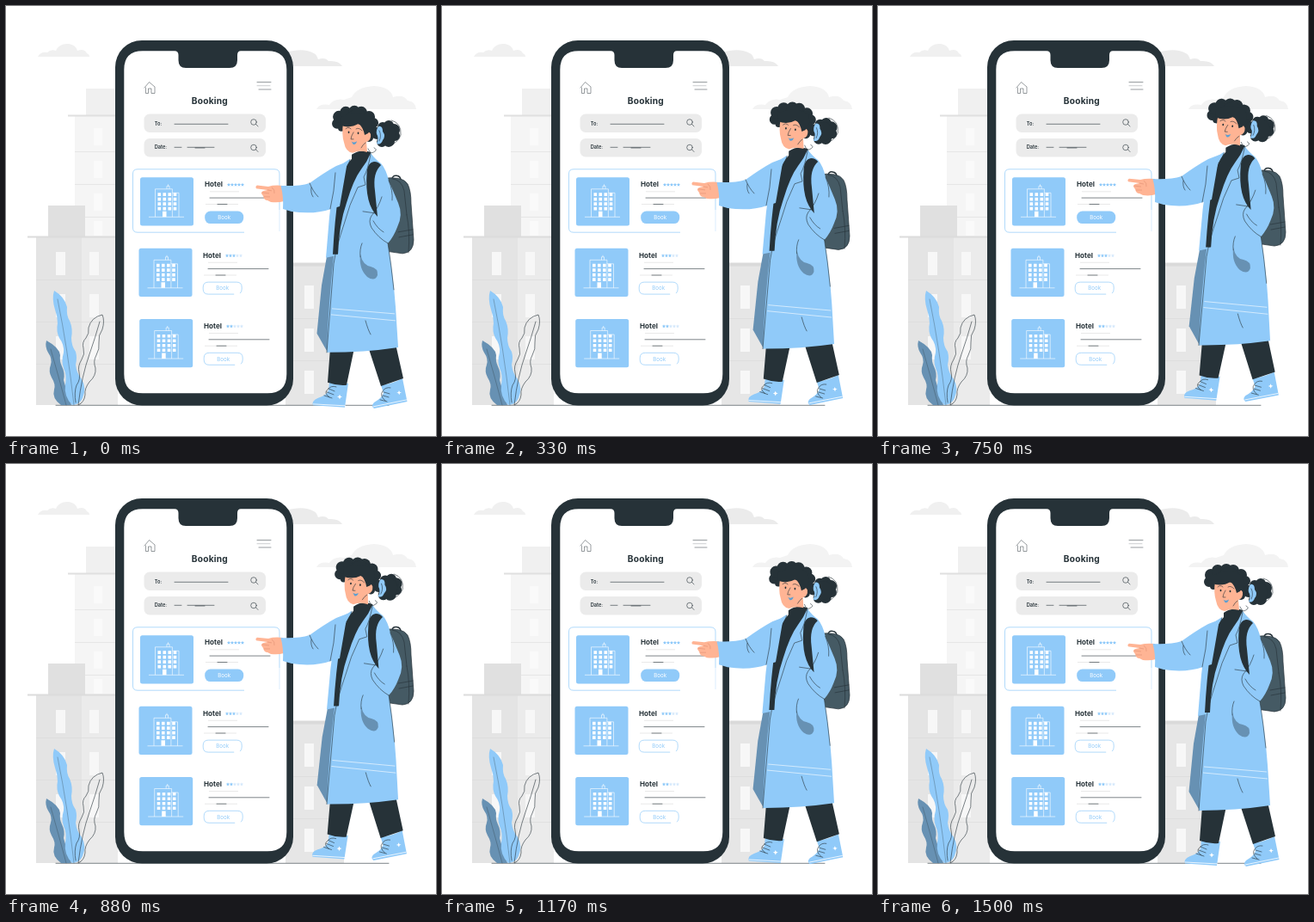
An HTML page that plays this animation: 500x500 px, repeating every 1.54 s.

```html
<!DOCTYPE html>
<html lang="en">
<head>
<meta charset="utf-8">
<title>Hotel booking</title>
<style>
  html, body { margin: 0; width: 100%; height: 100%; overflow: hidden; background: #fff; }
  svg { display: block; width: 100%; height: 100%; }
  text { font-family: Inter, sans-serif; fill: #263238; }
  .ink { fill: #263238; }
  .blue { fill: #90caf9; }
  .shade { fill: #6791b3; }
  .skin { fill: #ffb494; }
  .white { fill: #fff; }
  .line { fill: none; stroke: #263238; stroke-width: .6; stroke-linecap: round; stroke-linejoin: round; }
  .pale { fill: none; stroke: #e0e0e0; stroke-width: .7; }
  .edge { fill: none; stroke: #90caf9; stroke-width: .7; }
  .thin { fill: none; stroke: #fff; stroke-width: .6; }
</style>
</head>
<body>
<svg viewBox="0 0 500 500">
  <g id="clouds">
    <path fill="#f0f0f0" d="M37 59Q40 53 48 54Q52 50 58 52Q62 43 73 44Q81 45 83 52Q91 49 94 55Q97 56 97 59Z"/>
    <path fill="#ebebeb" d="M325 70V54Q340 50 350 52Q361 54 363 62Q371 59 375 64Q387 63 391 70Z"/>
    <path fill="#f3f3f3" d="M361 120Q365 113 376 115Q382 107 393 109L402 106Q408 94 428 93Q447 94 450 106Q462 102 467 110Q476 111 477 120Z"/>
  </g>

  <g id="city">
    <path fill="#f0f0f0" d="M93 96h40v32H93z"/>
    <path fill="#f5f5f5" d="M80 127h50v142H80z"/>
    <path fill="#e0e0e0" d="M72 126.5h57v2H72z"/>
    <path class="pale" d="M80 169.500h50M80 207.500h50M80 245.500h50"/>
    <path fill="#fafafa" d="M102 142h10v20h-10zM102 180h10v20h-10zM102 218h10v20h-10zM102 250h10v17h-10z"/>
    <path fill="#e0e0e0" d="M49 232h43v37H49z"/>
    <path fill="#ebebeb" d="M35 268h95v196H35z"/>
    <path fill="#e4e4e4" d="M35 268h53v196H35z"/>
    <path fill="#dcdcdc" d="M25 267.500h103v2H25z"/>
    <path stroke="#dcdcdc" stroke-width=".7" d="M35 318.500h95M35 367.500h95M35 416.500h95"/>
    <path fill="#f7f7f7" d="M58 286h11v27H58zM97 286h11v27H97zM58 335h11v27H58zM97 335h11v27H97zM58 384h11v27H58zM97 384h11v27H97z"/>
    <path fill="#e6e6e6" d="M325 299h68v165h-68z"/>
    <path fill="#dadada" d="M325 298.500h75v4H325z"/>
    <path stroke="#dcdcdc" stroke-width=".7" d="M330 363.500h63M330 412.500h63"/>
    <path fill="#f7f7f7" d="M347 325h11v27h-11zM347 375h11v27h-11zM347 424h11v27h-11z"/>
  </g>
  <path class="line" d="M58 464.300H445"/>

  <g id="plant">
    <path class="shade" d="M47 389Q62 397 63 406Q62 413 65 419Q69 427 67 435Q71 450 76 464H64Q53 456 56 446Q58 440 53 432Q49 425 52 417Q54 410 49 403Q45 396 47 389Z"/>
    <path class="blue" d="M56 331Q68 338 71 350Q70 360 74 366Q78 375 76 386Q76 395 81 402Q83 409 81 417Q82 427 88 434Q94 444 89 456Q86 463 77 464Q67 454 69 440Q71 430 67 421Q64 413 67 403Q68 394 62 386Q58 378 60 369Q60 361 57 353Q53 340 56 331Z"/>
    <path class="line" d="M81 461Q79 449 82 441Q87 434 85 426Q83 419 88 411Q92 405 90 398Q88 391 93 386Q97 381 96 374Q99 362 112 359Q115 366 112 376Q107 383 108 391Q109 399 105 406Q101 413 104 421Q105 430 97 437Q91 445 92 452Q91 461 84 464Q88 430 97 405Q104 385 109 367"/>
    <path class="line" stroke-opacity=".5" d="M60 341Q72 400 79 464M52 399Q61 430 70 464"/>
  </g>

  <g id="phone">
    <rect class="ink" x="127" y="40" width="207" height="424.500" rx="31"/>
    <path class="white" d="M159 52.300H196Q200.500 52.300 200.500 57V63Q200.500 72 209 72H260Q269 72 269 63V57Q269 52.300 273 52.300H304Q326.300 52.300 326.300 74V428Q326.300 450.300 304 450.300H159Q137.300 450.300 137.300 428V74Q137.300 52.300 159 52.300Z"/>
    <path class="line" stroke-opacity=".8" d="M161 95L166.500 88.500L173 94V101.500H169V96H165.500V101.500H162.500V95M292 88.500H308M294 97H308"/>
    <path class="line" stroke-opacity=".4" d="M292 92.700H307"/>
    <text x="215.800" y="113.500" font-size="10.200" font-weight="700" letter-spacing=".2">Booking</text>
    <rect x="160.500" y="125.500" width="141.500" height="21.500" rx="6.500" fill="#ebebeb"/>
    <rect x="160.500" y="154" width="141.500" height="21.500" rx="6.500" fill="#ebebeb"/>
    <text x="172.800" y="138.500" font-size="5.600" font-weight="600">To:</text>
    <text x="172.800" y="166" font-size="5.600" font-weight="600">Date:</text>
    <path class="line" d="M196 137.300H258M196 164.300H204M211 164.300H242M220 165H231M290.600 137.400L293 140M290.600 166.900L293 169.500"/>
    <circle class="line" cx="288" cy="135" r="3.300"/>
    <circle class="line" cx="288" cy="164.500" r="3.300"/>
    <path class="edge" d="M277 263.200H153Q147.500 263.200 147.500 258V195Q147.500 189.800 153 189.800H312Q318 189.800 318 195V237"/>
    <path class="edge" stroke-opacity=".45" d="M318 237V262"/>
    <g id="cards"></g>
  </g>

  <g id="traveller">
    <g id="pack">
      <path class="line" style="stroke-width:1.500" d="M449 202Q449 197 454 197.500Q459 198 459 203"/>
      <path fill="#455a64" stroke="#263238" stroke-width=".7" d="M436 201Q461 197 467 207Q471 215 471 230L474 272Q474 287 461 288L440 285Z"/>
      <path class="line" d="M449 201Q460 202 463 215L466 243M456 263L473 260M457 269L473 266M466 243Q470 262 468 287"/>
    </g>

    <g id="body">
      <path class="blue" d="M376 438Q388 440 398 439L394 467L357 464.500Q355 459 363 456Q373 453 375 447Z"/>
      <path class="blue" d="M436 441Q450 439 461 433L466.500 460L428 468Q424 465 428 461Q437 456 439 450Z"/>
      <path class="ink" d="M377 398L374 438Q385 442 396 441L405 398ZM421 396L436 442L462 433L453 393Z"/>
      <path stroke="#fff" stroke-width=".8" fill="none" d="M357 463L395 465M427 466L466 458"/>
      <path class="line" d="M370 453L379 456M373 449L381 452M375 445L382 448M376 455Q369 450 374 446Q378 441 384 443M435 458L443 460M438 453L445 455M439 449L446 451M441 459Q434 453 438 448Q441 443 447 444"/>
      <path class="white" d="M388 452l1 2 2 .5-2 1-1 2-1-2-2-1 2-.5zM457 447l1 2 2 .3-2 1-.6 2-1.200-2-2-.5 2-.8z"/>

      <path class="shade" d="M375 280L367 325L361.500 381L374 403L392 390V284Z"/>
      <path class="blue" d="M400 178Q386 186 382 196L376 245L372 293L386 290L398 240Z"/>
      <path class="ink" d="M402 173Q412 166 424 170L425 178L390 289L380 289Q382 250 387 215Q391 190 402 178Z"/>
      <path class="blue" d="M424 171Q430 179 436 183Q442 190 445 203L456 229Q462 243 455 257Q451 268 444 276Q450 310 453 350L456 397Q416 403 373 403Q375 345 381 291L386 289Q387 255 396 229Q404 202 413 190Q420 181 424 171Z"/>
      <path class="ink" d="M419.500 195Q420 182 428 181Q433 181 436 185Q426 194 429 215L432 245Q417 230 419.500 195Z"/>
      <path class="line" d="M424 172Q421 190 416 199L418 208L409 211Q399 231 393 254Q384 280 381 300L373 403M400 179L396 190L391 192L388 202"/>
      <path class="line" d="M437 222Q433 235 425 244Q421 250 425 258Q433 270 444 276M415 239L429 241M445 203Q450 215 449 226M418 366Q421 377 424 382M444 276Q448 301 451 330M427 250Q432 259 439 263"/>
      <path class="shade" d="M412 289Q415 302 424 303Q433 305 432 313Q429 321 420 315Q410 306 412 289Z"/>
      <path class="line" d="M414 276Q411 283 412 292"/>
      <path stroke="#fff" stroke-width=".6" fill="none" d="M379 352L452 358M378 359L453 366"/>
    </g>

    <g id="arm">
      <path class="skin" d="M322 209Q312 208 305 210L292 208.700Q289.500 210 291 212.300L304 214Q296 215 297 218L299 221Q300 226 304 226L308 228Q317 229 323 227Z"/>
      <path fill="none" stroke="#e08f72" stroke-width=".6" d="M304 214L309 215M298 217L306 218M300 222L307 222M309 211Q313 214 312 218"/>
      <path class="blue" d="M319.500 209Q340 210 353 206Q371 193 384 186L397 181L388 233L378 236Q358 243 332 239L322 236Q323 222 319.500 209Z"/>
      <path class="line" d="M353 206Q357 216 363 222M383 194Q382 215 377 236M355 211Q354 218 357 222"/>
    </g>

    <g id="head">
      <path class="line" d="M421 166Q424 174 429 169Q432 167 428 165M448 133Q460 136 459 150Q456 160 443 163"/>
      <g class="ink" id="curls"></g>
      <path class="skin" d="M392 136Q390 150 393 159Q395 170 403 171Q408 169 412 169Q416 169 420 170L419 158Q425 156 424 149Q422 144 418 149Q417 139 408 137Z"/>
      <path class="ink" d="M389 139Q400 143 410 137Q415 141 417 150L421 148Q429 139 423 129Q407 120 389 130Z"/>
      <path class="blue" d="M433 140Q438 139 438 146Q442 151 438 156Q436 162 431 160Q434 153 431 149Q430 144 433 140Z"/>
      <path class="line" d="M404 147Q401 152 401 155L404 155M395 143Q398 140 401 143M407 143Q410 141 414 145M413 165Q415 161 418 159M434 145Q437 151 434 157"/>
      <ellipse class="ink" cx="398.500" cy="147" rx=".9" ry="1.300"/>
      <ellipse class="ink" cx="409.500" cy="148" rx=".9" ry="1.300"/>
      <path d="M401.500 157.500Q404 160 408 157.500Q407 162 403.500 161Z" fill="#5f9fd0"/>
    </g>
  </g>
</svg>
<script>
const LOOP = 1540;
const $ = id => document.getElementById(id);

const star = (x, y, on) =>
  `<path fill="${on ? '#90caf9' : '#d6e9fb'}" d="M${x} ${y - 2.1}l.6 1.4 1.500 .2-1.100 1 .3 1.500-1.300-.7-1.300 .7 .3-1.500-1.100-1 1.500-.2z"/>`;

// White hotel pictogram, drawn relative to the top left of its tile
function hotelIcon() {
  let panes = '';
  for (const y of [18, 23.5, 29, 34.5])
    for (const x of [20.5, 26.5, 32.5, 38.7]) panes += `M${x} ${y}h3.600v3.600h-3.600z`;
  return `<path class="thin" d="M10 46H51M17.500 46V13.500H37.400V46M37.400 18H45V46M31 13.500V10H34V13.500M32.500 10V8"/>
    <path class="white" d="${panes}M26 39.500h4.500V46H26z"/>`;
}

function card({ x, y, textX, stars, solid }) {
  const starXs = [0, 1, 2, 3, 4].map(i => star(textX + 28 + i * 4, y + 8.300, i < stars)).join('');
  const bx = textX + .2, by = y + 39.300;
  const button = solid
    ? `<rect class="blue" x="${bx}" y="${by}" width="45" height="14.500" rx="6.500"/>`
    : `<path class="edge" d="M${bx + 36} ${by + 14}H${bx + 6}q-6 0-6-6v-2q0-6 6-6h33q6 0 6 6v2q0 3-2 5"/>`;
  return `<rect class="blue" x="${x}" y="${y}" width="62" height="56.300" rx="2.500"/>
    <g transform="translate(${x} ${y})">${hotelIcon()}</g>
    <text x="${textX}" y="${y + 11}" font-size="8.100" font-weight="700">Hotel</text>${starXs}
    <path class="pale" d="M${textX + 6} ${y + 16.500}h34M${textX + 1} ${y + 31.200}h38"/>
    <path class="line" d="M${textX + 6} ${y + 23.800}h70M${textX + 15} ${y + 31.200}h11"/>
    ${button}
    <text x="${bx + 22.500}" y="${by + 9.300}" font-size="6.200" text-anchor="middle"
      style="fill:${solid ? '#fff' : '#90caf9'}">Book</text>`;
}

$('cards').innerHTML = [
  { x: 156, y: 199.3, textX: 231, stars: 5, solid: true },
  { x: 154.5, y: 281.8, textX: 229, stars: 3 },
  { x: 155.2, y: 364, textX: 230, stars: 2 },
].map(card).join('');

const curls = [
  [385, 137, 6], [387, 129, 7], [395, 124, 7], [405, 123, 7], [413, 124, 7], [422, 129, 7],
  [427, 136, 6], [425, 146, 7], [422, 153, 5], [390, 142, 4], [408, 132, 12],
  [438, 141, 6], [445, 139, 6], [451, 144, 7], [452, 151, 6], [445, 157, 7], [437, 158, 6], [442, 149, 11],
  [431, 148, 7],
];
$('curls').innerHTML = curls.map(([x, y, r]) => `<circle cx="${x}" cy="${y}" r="${r}"/>`).join('');

function pose(id, p, dx, dy, turn, cx, cy) {
  $(id).setAttribute('transform', `translate(${dx * p} ${dy * p}) rotate(${turn * p} ${cx} ${cy})`);
}

// The traveller rises and sinks once per loop, leaning slightly at the top
function draw(now) {
  const p = (1 - Math.cos(2 * Math.PI * (now + 60) / LOOP)) / 2;
  pose('pack', p, 0, -9, 0, 0, 0);
  pose('body', p, 0, -8.3, .6, 400, 400);
  pose('arm', p, 0, -8, 0, 0, 0);
  pose('head', p, 1.5, -8, 4, 415, 165);
}

const start = performance.now();
function tick() {
  draw((performance.now() - start) % LOOP);
  requestAnimationFrame(tick);
}
tick();
</script>
</body>
</html>
```
